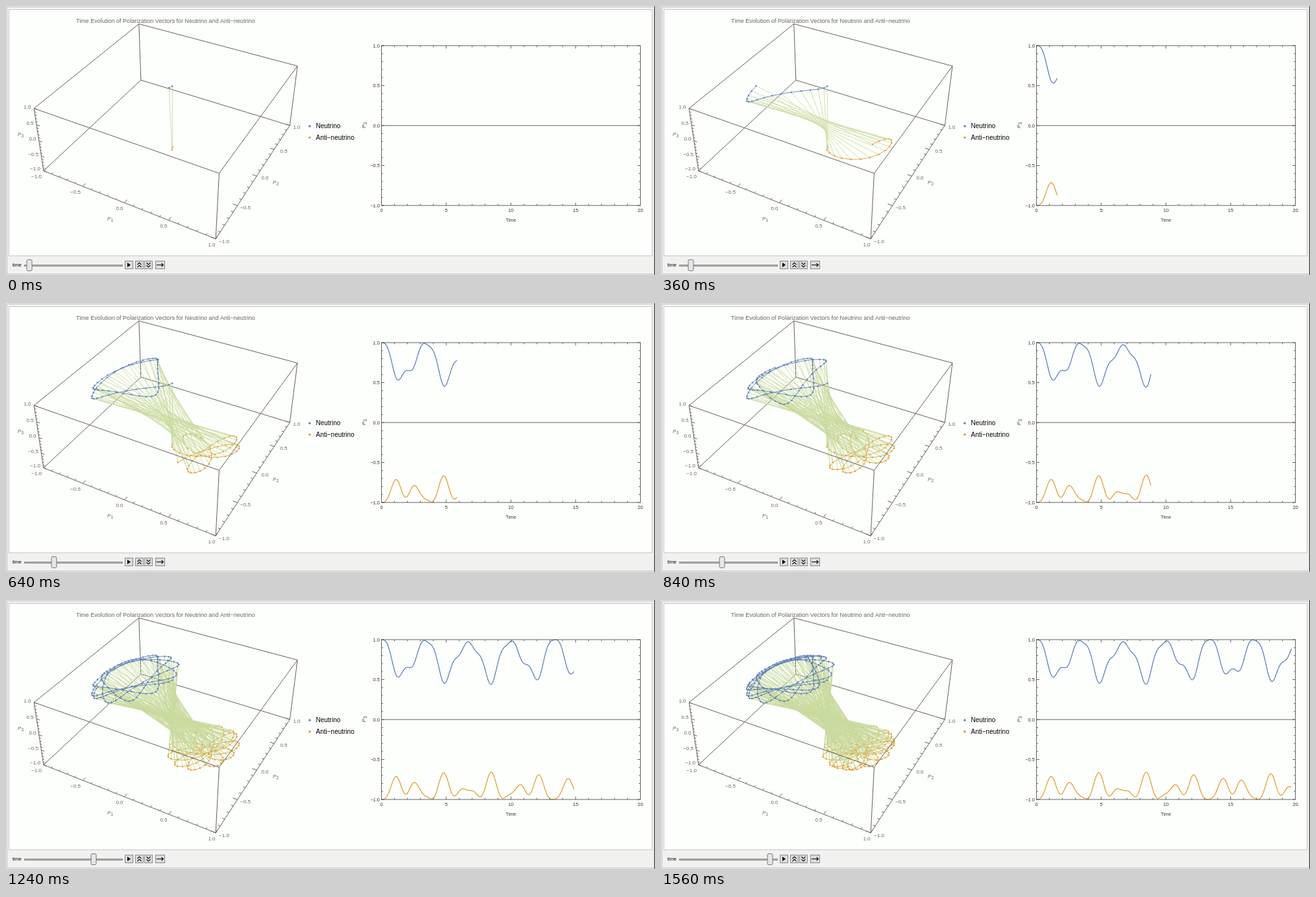
An HTML page with a canvas that plays this animation: 1000x414 px, repeating every 1600 ms.

```html
<!DOCTYPE html>
<html lang="en">
<head>
<meta charset="utf-8">
<title>Polarization vectors</title>
<style>
html, body { margin: 0; width: 100%; height: 100%; overflow: hidden; background: #f1f2f0; }
canvas { display: block; }
</style>
</head>
<body>
<canvas id="stage" width="1000" height="414"></canvas>
<script>
const ctx = document.getElementById('stage').getContext('2d');
const FONT = '"Liberation Sans", Arial, sans-serif';
const BLUE = '#5e81b5', ORANGE = '#dfa035', GREEN = '#cadb9f', LINE = '#606060', GREY = '#666';
const LOOP = 1600, STEP = 40, SAMPLE = 0.1;

// ---------- drawing helpers ----------
function path(points, color, width = 1) {
  ctx.beginPath();
  points.forEach(([x, y]) => ctx.lineTo(x, y));
  ctx.strokeStyle = color;
  ctx.lineWidth = width;
  ctx.stroke();
}

function dot([x, y], r, color) {
  ctx.beginPath();
  ctx.arc(x, y, r, 0, 7);
  ctx.fillStyle = color;
  ctx.fill();
}

function box(x, y, w, h, fill, stroke) {
  ctx.fillStyle = fill;
  ctx.fillRect(x, y, w, h);
  ctx.strokeStyle = stroke;
  ctx.lineWidth = 1;
  ctx.strokeRect(x + 0.5, y + 0.5, w - 1, h - 1);
}

function text(str, x, y, size, color, align = 'left', style = '') {
  ctx.font = `${style} ${size}px ${FONT}`;
  ctx.fillStyle = color;
  ctx.textAlign = align;
  ctx.fillText(str, x, y);
}

function component(index, x, y, color) {
  text('P', x - 4, y + 3, 8, color, 'left', 'italic');
  text(index, x + 1.5, y + 4.5, 6.5, color);
}

const label = v => v.toFixed(1).replace('-', '−');

// ---------- motion of the two vectors ----------
// Each vector precesses around a tilted axis as the sum of two normal modes.
const MODE1 = 3.32, MODE2 = -1.875;

function precess(t, side, tilt, mix) {
  const s = Math.sin(tilt), c = Math.cos(tilt);
  const u = side * s * (mix * Math.cos(MODE1 * t) + (1 - mix) * Math.cos(MODE2 * t));
  const v = side * s * (mix * Math.sin(MODE1 * t) + (1 - mix) * Math.sin(MODE2 * t));
  const along = side * Math.sqrt(1 - u * u - v * v);
  return [c * u - s * along, v, s * u + c * along];
}

const neutrino = t => precess(t, 1, 0.5585, 0.1975);
const antineutrino = t => precess(t, -1, 0.4276, 0.57);

// ---------- 3D plot ----------
const depth = ([x, y, z]) => 1 - 0.0565 * x + 0.105 * y - 0.0335 * z;

function project(p) {
  const [x, y, z] = p, w = depth(p);
  return [(256.4 + 112.4 * x + 95.7 * y - 8.7 * z) / w,
          (171.8 + 31.3 * x - 56.8 * y - 52.6 * z) / w];
}

const lerp = (a, b, k) => a.map((v, i) => v + (b[i] - v) * k);
const edge = (a, b, color = LINE, width = 1) => path([project(a), project(b)], color, width);

function edges(front) {
  for (const a of [-1, 1]) for (const b of [-1, 1]) {
    if (front === (a === -1 && b === 1)) edge([-1, a, b], [1, a, b]);
    if (front === (a === 1 && b === 1)) edge([a, -1, b], [a, 1, b]);
    if (front === (a === 1 && b === -1)) edge([a, b, -1], [a, b, 1]);
  }
}

function ticks3d() {
  for (let i = -10; i <= 10; i++) {
    const v = i / 10, len = i % 5 ? 0.024 : 0.05;
    edge([v, -1, -1], [v, -1 + len, -1]);
    edge([1, v, -1], [1 - len, v, -1]);
    edge([-1, -1, v], [-1 + len * 0.8, -1, v]);
  }
}

// Paints rods, trails and dots from back to front.
function vectors(t) {
  const PIECES = 12, LIFT = 0.002;
  const count = Math.floor(t / SAMPLE + 1e-6) + 1;
  const times = Array.from({ length: count }, (_, i) => i * SAMPLE);
  const upper = times.map(neutrino), lower = times.map(antineutrino);
  const parts = [];
  const add = (z, paint) => parts.push({ z, paint });

  upper.forEach((p, i) => {
    for (let k = 0; k < PIECES; k++) {
      const a = lerp(p, lower[i], k / PIECES), b = lerp(p, lower[i], (k + 1) / PIECES);
      add(depth(lerp(a, b, 0.5)), () => edge(a, b, GREEN, 0.9));
    }
  });
  for (const [points, color] of [[upper, BLUE], [lower, ORANGE]]) {
    points.forEach((p, i) => {
      add(depth(p) - 2 * LIFT, () => dot(project(p), 1.2, color));
      const q = points[i + 1];
      if (q) add(depth(lerp(p, q, 0.5)) - LIFT, () => edge(p, q, color, 0.9));
    });
  }
  parts.sort((a, b) => b.z - a.z).forEach(part => part.paint());
}

const labels3d = [
  [[47, 262], [107, 286], [175, 311], [243, 338], [317, 367]],
  [[336, 362], [369, 310], [399, 264], [428, 223], [448, 186]],
  [[45, 250], [42, 228], [41, 204], [37, 180], [33, 155]]
];

function plot3d(t) {
  edges(false);
  ticks3d();
  labels3d.forEach(axis => axis.forEach(([x, y], i) =>
    text(label(i / 2 - 1), x, y + 2.5, 8, GREY, 'center')));
  component(1, 160, 327, GREY);
  component(2, 415, 271, GREY);
  component(3, 22, 197, GREY);
  vectors(t);
  edges(true);

  text('Time Evolution of Polarization Vectors for Neutrino and Anti−neutrino', 108, 26, 9.06, GREY);
  dot([468, 185], 1.8, BLUE);
  dot([468, 202.5], 1.8, ORANGE);
  text('Neutrino', 477.5, 188, 10, '#000');
  text('Anti−neutrino', 477.5, 206, 10, '#000');
}

// ---------- 2D plot ----------
const plotX = t => 578.5 + t * 19.95;
const plotY = v => 184 - v * 123;

function plot2d(t) {
  const left = plotX(0), right = plotX(20), top = plotY(1), bottom = plotY(-1);
  path([[left, plotY(0)], [right, plotY(0)]], LINE);
  for (const [vector, color] of [[neutrino, BLUE], [antineutrino, ORANGE]]) {
    const points = [];
    for (let s = 0; s < t; s += 0.03) points.push([plotX(s), plotY(vector(s)[2])]);
    points.push([plotX(t), plotY(vector(t)[2])]);
    path(points, color, 1.3);
  }
  ctx.strokeStyle = LINE;
  ctx.lineWidth = 1;
  ctx.strokeRect(left, top, right - left, bottom - top);

  for (let i = 0; i <= 20; i++) {
    const len = i % 5 ? 2.5 : 4.5;
    const x = plotX(i), y = plotY(i / 10 - 1);
    path([[x, top], [x, top + len]], LINE);
    path([[x, bottom], [x, bottom - len]], LINE);
    path([[left, y], [left + len, y]], LINE);
    path([[right, y], [right - len, y]], LINE);
    if (i % 5 === 0) {
      text(i, x, 317, 7.5, '#333', 'center');
      text(label(i / 10 - 1), 576, y + 2.5, 7.5, '#333', 'right');
    }
  }
  text('Time', 778, 331.5, 7.3, '#333', 'center');
  ctx.save();
  ctx.translate(551, 184);
  ctx.rotate(-Math.PI / 2);
  component(3, 0, 0, '#444');
  ctx.restore();
}

// ---------- window and controls ----------
function background() {
  ctx.fillStyle = '#f1f2f0';
  ctx.fillRect(0, 0, 1000, 414);
  ctx.strokeStyle = '#bdbdbd';
  ctx.lineWidth = 1;
  ctx.strokeRect(1.5, 1.5, 997, 411);
  box(4, 5, 992, 380, '#fdfffc', '#c6c6c6');
  path([[999.5, 0], [999.5, 414]], '#444');
}

function chevrons(x, dir) {
  for (const y of [396.5, 400.5])
    path([[x - 3, y + 1.5 * dir], [x, y - 1.5 * dir], [x + 3, y + 1.5 * dir]], '#111', 1.1);
}

function controls(t) {
  text('time', 10, 401, 7.4, '#000');
  box(28, 398, 152, 3, '#b5b5b5', '#8c8c8c');
  const x = Math.round(34.7 + 6.75 * t);
  ctx.beginPath();
  ctx.roundRect(x - 4, 390.5, 8, 17, 2);
  ctx.fillStyle = '#e6e6e6';
  ctx.fill();
  ctx.strokeStyle = '#777';
  ctx.lineWidth = 1;
  ctx.stroke();

  for (const [bx, w] of [[183, 13], [199, 13], [213, 13], [230, 15]])
    box(bx, 392, w, 13, '#dcdcdc', '#8a8a8a');
  ctx.fillStyle = '#000';
  ctx.beginPath();
  ctx.moveTo(187, 395);
  ctx.lineTo(192, 398.5);
  ctx.lineTo(187, 402);
  ctx.fill();
  chevrons(205.5, 1);
  chevrons(219.5, -1);
  path([[232, 398.5], [242, 398.5]], '#111', 1.1);
  path([[239.5, 396], [242.5, 398.5], [239.5, 401]], '#111', 1.1);
}

// ---------- clock ----------
function simulationTime(ms) {
  const step = Math.floor((ms % LOOP) / STEP);
  return step < 7 ? 0.15 : 0.4 + 0.603 * (step - 7);
}

function draw() {
  const t = simulationTime(performance.now());
  background();
  plot3d(t);
  plot2d(t);
  controls(t);
  requestAnimationFrame(draw);
}
draw();
</script>
</body>
</html>
```
